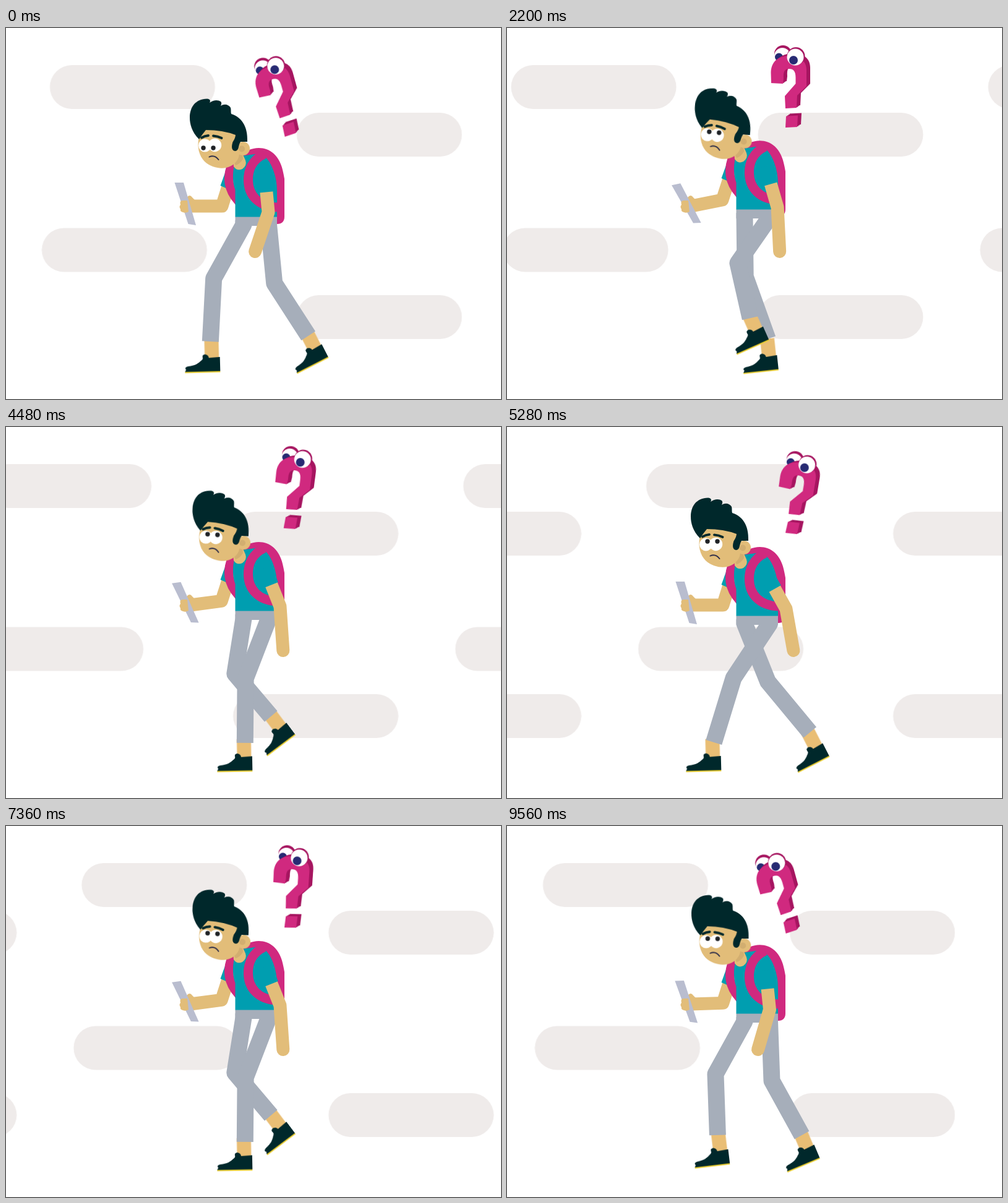
An HTML page without scripts for the animation above (9600 ms loop, 800 px wide and 600 px high).

```html
<!DOCTYPE html>
<html lang="en">
<head>
<meta charset="utf-8">
<title>Puzzled walk</title>
<style>
@property --bob { syntax: "<number>"; inherits: true; initial-value: 0; }

html, body { margin: 0; width: 100%; height: 100%; overflow: hidden; background: #fff; }
svg { display: block; width: 800px; height: 600px; --bob: 0; animation: bob .96s linear infinite; }

.pink { fill: #d0297f; }
.plum { fill: #a61560; }
.teal { fill: #009eb0; }
.skin { fill: #e2bd79; }
.shade { fill: #d2ae70; }
.dark { fill: #00282b; }
.grey { fill: #a6aeba; }
.navy { fill: #272a73; }
.white { fill: #fff; }
.line { fill: none; stroke-linecap: round; stroke-linejoin: round; }
.strap { fill: none; stroke: #d0297f; }
.limb { fill: none; stroke: #e2bd79; stroke-width: 21; stroke-linecap: round; stroke-linejoin: round; }
.pants { fill: none; stroke: #a6aeba; stroke-width: 27; stroke-linejoin: round; }

/* everything on the upper body rides on --bob */
.body { transform: translateY(calc(var(--bob) * 1px)); }
.head { transform-origin: 380px 212px; transform: translateY(calc(var(--bob) * 1px)) rotate(calc(var(--bob) * -.46deg)); }
.phone { transform-origin: 290px 284px; transform: rotate(calc(var(--bob) * .96deg)); }
.query { transform: translateY(calc((var(--bob) + 12) * 1px)); }
.sway { transform-origin: 461px 160px; animation: sway 9.6s infinite; }
.gaze { animation: gaze 9.6s linear infinite; }
.pills { fill: #efebea; animation: scroll 2.4s linear infinite; }

.foot { animation: foot .96s linear infinite; }
.near .foot { animation-delay: -.48s; }
.far .pants { animation: farLeg .96s linear infinite; }
.near .pants { animation: nearLeg .96s linear infinite; }
.farArm { animation: farArm .96s linear infinite; }
.nearArm { animation: nearArm .96s linear infinite; }
/* the bare arm starts inside the sleeve */
.bare { stroke-dasharray: 999 24; stroke-dashoffset: -24; }
.sleeve { stroke: #009eb0; stroke-width: 23; stroke-linecap: butt; stroke-dasharray: 30 999; }
.bare { stroke-linecap: butt; }

@keyframes bob { 0%, 50%, 100% { --bob: 0; } 29.17%, 75% { --bob: -12; } }
@keyframes scroll { to { transform: translateX(771px); } }
@keyframes gaze { 0%, 11% { transform: translate(-5px, 9px); } 12.5%, 100% { transform: none; } }

@keyframes sway {
  0% { transform: translateX(0) rotate(-15.4deg); animation-timing-function: cubic-bezier(.33, 0, .67, .86); }
  22.92% { transform: translateX(0) rotate(0deg); animation-timing-function: linear; }
  38.75% { transform: translateX(-3px) rotate(4.5deg); animation-timing-function: cubic-bezier(.33, .25, .67, 1); }
  55% { transform: translateX(0) rotate(9.5deg); animation-timing-function: cubic-bezier(.33, 0, .67, -.1); }
  76.67% { transform: translateX(0) rotate(4deg); animation-timing-function: cubic-bezier(.33, .17, .67, .93); }
  89.17% { transform: translateX(0) rotate(-13.8deg); animation-timing-function: cubic-bezier(.33, .76, .67, 1); }
  100% { transform: translateX(0) rotate(-15.4deg); }
}

/* heel position and pitch: stance, push-off, swing */
@keyframes foot {
  0%, 100% { transform: translate(346px, 556px) rotate(-1.5deg); }
  16.67% { transform: translate(398px, 556.5px) rotate(-1deg); }
  29.17% { transform: translate(438.5px, 553px) rotate(-6deg); }
  37.5% { transform: translate(473px, 547px) rotate(-14deg); }
  50% { transform: translate(521.5px, 533px) rotate(-27deg); }
  66.67% { transform: translate(468px, 497.5px) rotate(-37deg); }
  79.17% { transform: translate(424px, 504.5px) rotate(-24deg); }
  87.5% { transform: translate(390px, 527px) rotate(-18deg); }
}
@keyframes farLeg {
  0%, 100% { d: path("M384 311V318L335.5 405L330 507"); }
  16.67% { d: path("M384 304V311L364 406L383 510"); }
  29.17% { d: path("M384 299V306L385 402L421 503"); }
  37.5% { d: path("M384 304V311L400 408L449 504"); }
  50% { d: path("M384 311V318L422 412L490 494"); }
  66.67% { d: path("M384 303V310L370 399L428.5 468"); }
  79.17% { d: path("M384 301V308L351 391L394 469"); }
  87.5% { d: path("M384 305V312L340 393L362 485"); }
}
@keyframes nearLeg {
  0%, 100% { d: path("M424.5 311V318L434 413L489 498"); }
  16.67% { d: path("M424.5 304V311L390 396L430 468"); }
  29.17% { d: path("M424.5 299V306L373 380L393.5 469"); }
  37.5% { d: path("M424.5 304V311L366 391L362 486"); }
  50% { d: path("M424.5 311V318L366 406L334 510"); }
  66.67% { d: path("M424.5 303V310L387 407L386 511"); }
  79.17% { d: path("M424.5 301V308L404 406L421 504"); }
  87.5% { d: path("M424.5 305V312L415.5 410L450.5 504.5"); }
}
@keyframes nearArm {
  0%, 100% { d: path("M418 235.5L424 298L402.5 361.5"); }
  16.67% { d: path("M418 228.5L430 293L417 361.5"); }
  29.17% { d: path("M418 223.5L437 290L440.5 361.5"); }
  37.5% { d: path("M418 228.5L444 291L454 361.5"); }
  50% { d: path("M418 235.5L451 294L463 361.5"); }
  66.67% { d: path("M418 227.5L443 290L448 361.5"); }
  79.17% { d: path("M418 225.5L433 289L424.5 361.5"); }
  87.5% { d: path("M418 229.5L425.5 294L412 361.5"); }
}
@keyframes farArm {
  0%, 50%, 100% { d: path("M361 250L349 288L298 288"); }
  29.17%, 75% { d: path("M361 238L348 278L298 288"); }
}
.bare { stroke-linecap: round; }
</style>
</head>
<body>
<svg viewBox="0 0 800 600">
  <defs>
    <g id="row">
      <rect x="70.500" y="60" width="267" height="71" rx="35.500"/>
      <rect x="469.500" y="137" width="267" height="71" rx="35.500"/>
      <rect x="57.500" y="323.500" width="267" height="71" rx="35.500"/>
      <rect x="469.500" y="432" width="267" height="71" rx="35.500"/>
    </g>
    <g id="shoe">
      <rect x="-24.500" y="-52" width="23" height="32" fill="#e9be75"/>
      <path class="dark" d="M0-1V-24L-18-23C-18-29-27-31-28-26C-28-22-27-22-29-20C-36-14-40-11-52-10C-57-9-57-6-55-5L-57-1Z"/>
      <path d="M-57-.300H0" stroke="#e8cb2d" stroke-width="2"/>
    </g>
    <path id="hook" d="M427 89L426.500 72C427 55 437 46 454 45C472 44 484 52 484 68V94L469 109L468 129L450 130L449 110L466.500 90V80C466.500 70 463 66 456 66C449 66 446 70 447 82L446 90Z"/>
    <path id="dot" d="M451 142.500L470 141.500L469 160L450 161Z"/>
    <g id="mark"><use href="#hook"/><use href="#dot"/></g>
  </defs>

  <g class="pills"><use href="#row"/><use href="#row" x="-771"/></g>

  <g class="query"><g class="sway">
    <circle class="plum" cx="446" cy="42" r="14"/>
    <circle class="white" cx="445" cy="45" r="13"/>
    <circle class="navy" cx="439.500" cy="47" r="6.500"/>
    <g class="plum">
      <use href="#mark" x="6" y="-4"/>
      <use href="#mark" x="4" y="-2.700"/>
      <use href="#mark" x="2" y="-1.300"/>
    </g>
    <use class="pink" href="#mark"/>
    <circle class="plum" cx="467" cy="45.500" r="14.500"/>
    <circle class="white" cx="466" cy="47" r="13.500"/>
    <circle class="navy" cx="463" cy="52" r="7"/>
  </g></g>

  <path class="body pink" d="M378 207C398 187 440 186 448.500 236L450 244V305Q450 317 438 317H400V220Z"/>

  <path class="limb farArm" d="M361 250L349 288L298 288"/>
  <g class="body">
    <path class="teal" d="M357 226L346.500 255L358 260L372 235Z"/>
    <path class="strap" stroke-width="14" d="M367 215C358 234 355 258 376 281"/>
  </g>
  <path class="skin" d="M292 274Q297 268 301 274L306 279V297L292 299Z"/>
  <path class="phone" fill="#b9bdcf" d="M272.500 250H287L307 319L294.500 317Z"/>
  <path class="skin" d="M285 279H293L295 297Q290 300 286 298Q281 297 282 293Q279 289 282 286Q280 280 285 279Z"/>

  <g class="far">
    <g class="foot"><use href="#shoe"/></g>
    <path class="pants" d="M384 311V318L335.500 405L330 507"/>
  </g>
  <g class="near">
    <g class="foot"><use href="#shoe"/></g>
    <path class="pants" d="M424.500 311V318L434 413L489 498"/>
  </g>

  <g class="body">
    <path class="grey" d="M370.500 305H438V320H370.500Z"/>
    <path class="teal" d="M380 207L410 203Q424 208 432 230Q438 246 438 264V305.500H370.500V262C366 250 366 235 369 222Z"/>
    <path class="strap" stroke-width="15" d="M417 204C398 213 391 230 391.500 247C392 270 408 289 438 290"/>
    <path class="skin" d="M366 205L380 198L387 214Q390 222 382 228Q373 232 368 224Z"/>
    <path class="shade" d="M364 208L382 202L383 212Q378 220 371 222Z"/>
  </g>

  <path class="limb nearArm bare" d="M418 235.500L424 298L402.500 361.500"/>
  <path class="limb nearArm sleeve" d="M418 235.500L424 298L402.500 361.500"/>

  <g class="head">
    <circle class="skin" cx="383" cy="195" r="11"/>
    <path class="skin" d="M312 176C308 192 312 207 321 216C332 226 346 228 356 226C367 223 373 217 376 209L380 190L372 160H320Z"/>
    <circle class="shade" cx="381" cy="195.500" r="5"/>
    <path class="dark" d="M312 180C300 168 297 155 297 145C297 128 306 115 325 114.500C330 115 331 118 329 121C335 116 343 116 347 119C349 121 348 124 347 126C353 122 360 124 363 129C364 133 363 136 364 139C380 144 391 158 390 184H379C375 190 377 198 371 199C365 199 364 193 366 186C367 182 370 181 371 173Q350 165 323 165Q318 171 312 180Z"/>
    <path class="line" stroke="#00282b" stroke-width="3.800" d="M316 177.500Q321 174.500 327 174M335 174.500Q342 175 348.500 178"/>
    <circle class="white" cx="321.500" cy="190" r="10.500"/>
    <circle class="white" cx="337.500" cy="189.500" r="10.700"/>
    <g class="gaze" fill="#1f2226">
      <circle cx="324" cy="185" r="3.700"/>
      <circle cx="340" cy="185" r="3.700"/>
    </g>
    <path class="line" stroke="#2b2b48" stroke-width="1.900" d="M328.500 208.500Q337 204.500 343.500 213"/>
  </g>
</svg>
</body>
</html>
```
